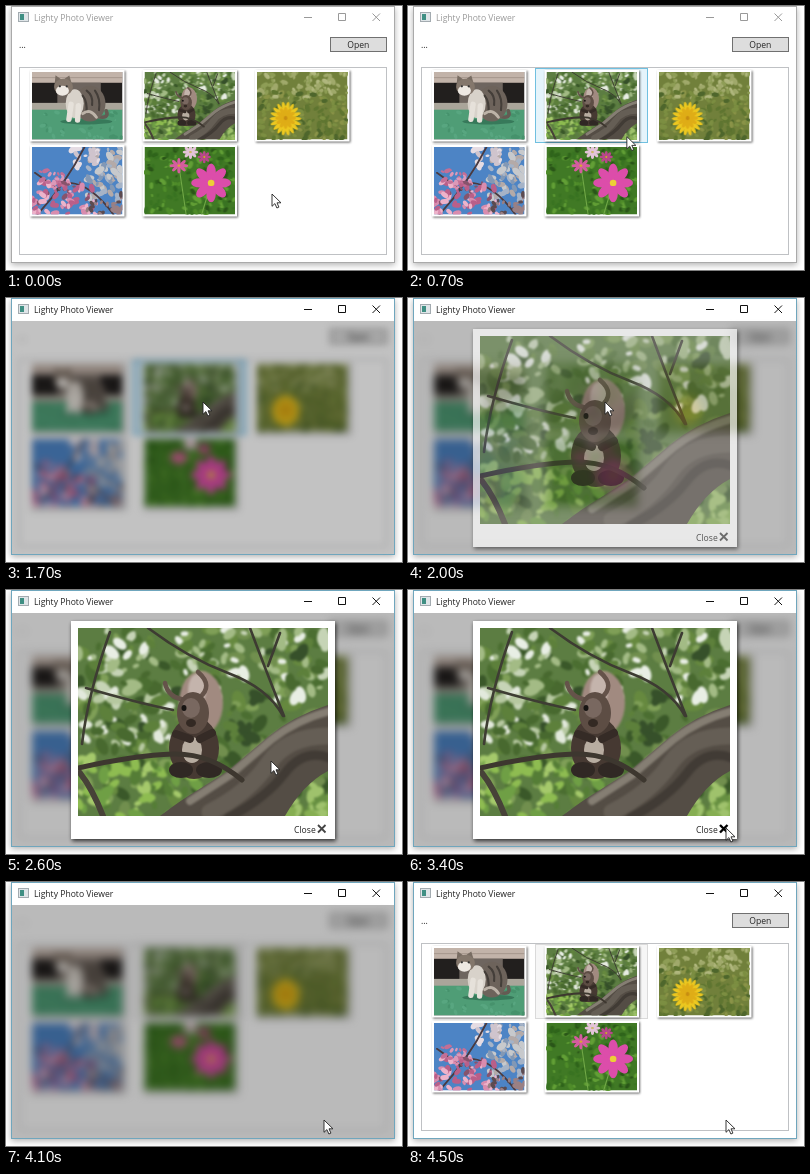
An HTML page that plays this animation: 396 px wide and 264 px high, repeating every 4600 ms.

```html
<!DOCTYPE html>
<html lang="en">
<head>
<meta charset="utf-8">
<title>Photo viewer</title>
<style>
html, body { margin: 0; width: 100%; height: 100%; overflow: hidden; background: #fff; }
svg { display: block; width: 396px; height: 264px; }
text { font: 8.6px "Open Sans", "Noto Sans", sans-serif; fill: #222; }
.line { fill: none; }
.soft { filter: blur(1.3px); }
#frame { filter: drop-shadow(0 2px 3px rgba(0,0,0,.3)); }
.card { fill: #fff; filter: drop-shadow(1px 1px 1.2px rgba(0,0,0,.6)); }
#dialog > rect { fill: #fff; filter: drop-shadow(1px 2px 2px rgba(0,0,0,.75)); }
</style>
</head>
<body>
<svg viewBox="0 0 396 264">
  <defs id="photos"></defs>
  <rect id="frame" x="5.5" y=".5" width="383" height="256" fill="#fff"/>

  <g id="content">
    <text x="13" y="42">...</text>
    <rect x="324.5" y="31.5" width="56" height="14" fill="#ddd" stroke="#707070"/>
    <text x="352.3" y="42" text-anchor="middle">Open</text>
    <rect class="line" x="13.5" y="61.5" width="367" height="187" stroke="#bfc1c4"/>
    <rect id="item" x="127.5" y="62.5" width="112" height="74"/>
    <g id="thumbs"></g>
  </g>
  <rect id="shade" x="6" y="23" width="382" height="233"/>

  <g id="dialog">
    <rect x="65" y="31" width="264" height="218"/>
    <use href="#squirrel" x="72" y="38" width="250" height="188"/>
    <text x="288" y="243">Close</text>
    <path id="cross" class="line" d="M312 235l7.5 7.5m0-7.5l-7.5 7.5"/>
  </g>

  <g>
    <rect x="12.5" y="6.5" width="10" height="9" fill="#dfe5e8" stroke="#a3abb0"/>
    <path d="M14 8h4v6h-4z" fill="#3f8f83"/>
  </g>
  <text id="title" x="28" y="15">Lighty Photo Viewer</text>
  <path id="buttons" class="line" d="M298 11.5h8M332.5 7.5h7v7h-7zM366.5 7.5l7.5 7.5m0-7.5l-7.5 7.5"/>
  <path id="cursor" d="M0 0V12.3L2.9 9.6 4.9 14 6.9 13.1 5 8.8H9Z" fill="#fff" stroke="#222" stroke-width=".9"/>
</svg>
<script>
const $ = id => document.getElementById(id);

let seed = 7;
const rnd = () => (seed = seed * 16807 % 2147483647) / 2147483647;
const oval = (x, y, rx, ry, fill, turn = 0) =>
  `<ellipse cx="${x}" cy="${y}" rx="${rx}" ry="${ry}" fill="${fill}" transform="rotate(${turn} ${x} ${y})"/>`;
const box = (x, y, w, h, fill) => `<rect x="${x}" y="${y}" width="${w}" height="${h}" fill="${fill}"/>`;
const shape = (d, fill) => `<path d="${d}" fill="${fill}"/>`;
const stroke = (d, color, width) =>
  `<path class="line" d="${d}" stroke="${color}" stroke-width="${width}" stroke-linecap="round"/>`;
const soft = parts => `<g class="soft">${parts}</g>`;

// Scatter n leaf-like ovals over an area
function leaves(n, colors, x, y, w, h, size) {
  let out = '';
  while (n--) {
    const r = size * (.4 + rnd() * .8);
    out += oval((x + rnd() * w).toFixed(1), (y + rnd() * h).toFixed(1), r.toFixed(1), (r * .6).toFixed(1),
      colors[Math.floor(rnd() * colors.length)], Math.round(rnd() * 180));
  }
  return out;
}

function flower(x, y, rx, ry, petals, color, heart) {
  let out = '';
  for (let i = 0; i < petals; i++) {
    const a = i / petals * 2 * Math.PI;
    out += oval(x + Math.cos(a) * rx * .58, y + Math.sin(a) * ry * .58,
      rx * .44, ry * Math.min(.25, 2 / petals), color, a * 180 / Math.PI);
  }
  return out + oval(x, y, rx * .17, ry * .17, heart);
}

const photos = {
  cat: () => box(0, 0, 250, 188, '#221f1e') + box(0, 0, 250, 30, '#c2b3a9') +
    box(0, 15, 250, 2, '#9b8b81') + box(70, 30, 120, 60, '#6e655f') + box(0, 86, 250, 20, '#aaa59a') +
    box(0, 105, 250, 83, '#4f9d76') + soft(leaves(45, ['#58a680', '#46926c'], 0, 112, 250, 76, 8)) +
    oval(150, 138, 72, 8, '#37795a') +
    stroke('M180 124Q215 132 205 108', '#645b53', 10) +
    oval(160, 88, 43, 50, '#6d635b') + oval(118, 88, 25, 40, '#d8d2ca') +
    stroke('M108 90L102 132M128 94L126 134', '#e6e1da', 15) +
    shape('M62 38L65 9 84 23 103 10 112 40Z', '#786c62') + oval(87, 42, 26, 23, '#84776c') +
    oval(84, 52, 18, 14, '#eee9e3') + oval(77, 40, 3, 3, '#333') + oval(96, 40, 3, 3, '#333') +
    stroke('M151 52Q170 66 166 92M174 52Q190 74 185 106M140 66Q154 84 150 114', '#443e39', 6) +
    stroke('M140 116Q160 100 178 126', '#bdb3a8', 8),

  squirrel: () => box(0, 0, 250, 188, '#5c7d42') + soft(
      leaves(170, ['#4b6e31', '#66893f', '#7f9f57', '#3a5829', '#718f4e'], 0, 0, 250, 188, 10) +
      leaves(75, ['#e8eee4', '#c6d4b6', '#a3bb85'], 0, 0, 250, 75, 8) +
      leaves(35, ['#e2e9dc', '#b6c8a0'], 0, 60, 100, 60, 7) +
      leaves(70, ['#36502a', '#48692f', '#5d803b'], 0, 15, 250, 110, 9) +
      leaves(65, ['#8ebc51', '#a5c96b', '#6f9f45', '#557d36'], 0, 132, 125, 56, 8) +
      leaves(22, ['#86ae52', '#9fc26c', '#668f41'], 210, 155, 40, 33, 8)) +
    stroke('M32 4Q10 65 4 116M8 60Q60 75 95 82', '#3e3d33', 2.6) +
    stroke('M2 145Q14 160 25 188', '#474238', 6) +
    stroke('M70 0Q110 30 150 45T205 88M172 0Q185 35 206 88M202 5L190 38', '#3d3b32', 2.6) +
    shape('M82 188Q103 172 120 162L150 143 190 109Q215 88 250 77V143Q225 156 207 188Z', '#544d45') +
    soft(stroke('M112 173L152 147 193 112Q218 92 252 83', '#857e73', 8) +
      stroke('M132 184Q170 165 190 136T252 108', '#655e55', 17) +
      stroke('M150 190Q188 170 207 145T252 130', '#413b35', 9)) +
    soft(oval(123, 75, 22, 32, '#a18a80') + oval(119, 62, 9, 16, '#c4b4ac')) +
    oval(116, 120, 25, 31, '#463932') +
    stroke('M108 72Q90 70 87 55M121 70Q136 58 120 44', '#65534a', 4.5) +
    oval(115, 85, 16, 21, '#5d4d44') + oval(113, 80, 9, 10, '#796860') +
    oval(114, 122, 10, 13, '#b8ada1') + oval(106, 80, 2.5, 3, '#171412') + oval(113, 95, 5, 4, '#332923') +
    stroke('M98 106L112 111M134 105L122 111', '#352b26', 8) +
    oval(103, 142, 12, 8, '#302824') + oval(131, 142, 13, 8, '#302824') +
    stroke('M0 140Q58 127 95 126T164 152', '#3d372f', 5),

  dandelion: () => box(0, 0, 250, 188, '#71803b') + soft(
      leaves(90, ['#a0a96b', '#8e9d56', '#b0b77e'], 0, 0, 250, 75, 10) +
      leaves(150, ['#5f7531', '#7c8e42', '#4e662c', '#8a9348'], 0, 55, 250, 133, 10)) +
    flower(79, 130, 43, 49, 18, '#edc820', '#d29b12') + flower(79, 128, 28, 31, 12, '#dfad17', '#c78d12'),

  blossom: () => box(0, 0, 250, 188, '#4d84c5') +
    soft(leaves(60, ['#a5b3c7', '#c7c9cc', '#8298b5', '#b4aaa8'], 155, 0, 95, 145, 13) +
      leaves(18, ['#e5dce3', '#cfc4cd'], 105, 0, 80, 55, 12)) +
    stroke('M15 188Q95 100 145 0M75 120L8 72M105 100Q165 105 225 188', '#4a3a40', 5) +
    soft(leaves(80, ['#d98cae', '#b95f89', '#edb3ca', '#87536c'], 0, 95, 180, 93, 11) +
      leaves(20, ['#dc99b8', '#c36f96'], 20, 55, 65, 55, 9) +
      leaves(25, ['#5c4b50', '#9a8084'], 150, 130, 100, 58, 11)),

  cosmos: () => box(0, 0, 250, 188, '#407925') +
    soft(leaves(150, ['#2f641b', '#4f8c2a', '#629f36', '#397322', '#2a5519'], 0, 0, 250, 188, 10)) +
    stroke('M184 100L158 188M95 52L115 188', '#71a847', 3) +
    flower(127, 14, 21, 18, 8, '#e3c3d8', '#d3ba66') + flower(95, 52, 25, 18, 8, '#d55c9f', '#d6ac32') +
    flower(165, 28, 18, 16, 8, '#b9478b', '#d6ac32') +
    flower(184, 100, 54, 52, 8, '#dc4daa', '#edcf37')
};

const names = Object.keys(photos);
$('photos').innerHTML = names.map(n =>
  `<symbol id="${n}" viewBox="0 0 250 188" preserveAspectRatio="none">${photos[n]()}</symbol>`).join('');
$('thumbs').innerHTML = names.map((n, i) => {
  const x = 24 + i % 3 * 112.5, y = 64 + Math.floor(i / 3) * 75;
  return `<rect class="card" x="${x}" y="${y}" width="94.5" height="71.5"/>
    <use href="#${n}" x="${x + 2}" y="${y + 2}" width="90.5" height="67.5"/>`;
}).join('');

const LOOP = 4600, STEP = 100;
const ramp = (t, from, to) => Math.min(1, Math.max(0, (t - from) / (to - from)));
const ease = p => p * p * (3 - 2 * p);
const set = (id, attrs) => { for (const k in attrs) $(id).setAttribute(k, attrs[k]); };

// Pointer moves: start, end, dx, dy
const moves = [[200, 1000, -69, -84], [2300, 2600, 68, 67], [2600, 3200, 53, 67]];
const itemLook = {
  none: ['none', 'none'],
  hover: ['#e5f4fb', '#70c0e0'],
  active: ['#c9e6f6', '#26a0da'],
  idle: ['#f6f6f6', '#dadada']
};

function draw(now) {
  const t = Math.floor(now % LOOP / STEP) * STEP;
  let x = 266, y = 188;
  for (const [from, to, dx, dy] of moves) {
    const p = ease(ramp(t, from, to));
    x += dx * p;
    y += dy * p;
  }
  const active = t >= 1200;
  const look = t >= 2000 ? 'idle' : active ? 'active' : x < 240 && y < 137 ? 'hover' : 'none';
  const [fill, edge] = itemLook[look];
  const dim = ramp(t, 1300, 1750) - ramp(t, 4100, 4450);
  const shown = ramp(t, 1700, 2150) - ramp(t, 3550, 4000);
  const over = t >= 3200 && t < 4100;

  set('cursor', { transform: `translate(${x} ${y})` });
  set('frame', { stroke: active ? '#6fa6bd' : '#aaa' });
  $('title').style.fill = active ? '#222' : '#999';
  set('buttons', { stroke: active ? '#111' : '#999' });
  set('item', { fill, stroke: edge });
  set('shade', { opacity: .27 * dim });
  set('dialog', { opacity: shown });
  set('cross', { stroke: over ? '#000' : '#444', 'stroke-width': over ? 2.4 : 1.8 });
  $('content').style.filter = dim > 0 ? `blur(${4.3 * dim}px)` : 'none';
}

const start = performance.now();
(function tick() {
  draw(performance.now() - start);
  requestAnimationFrame(tick);
})();
</script>
</body>
</html>
```
